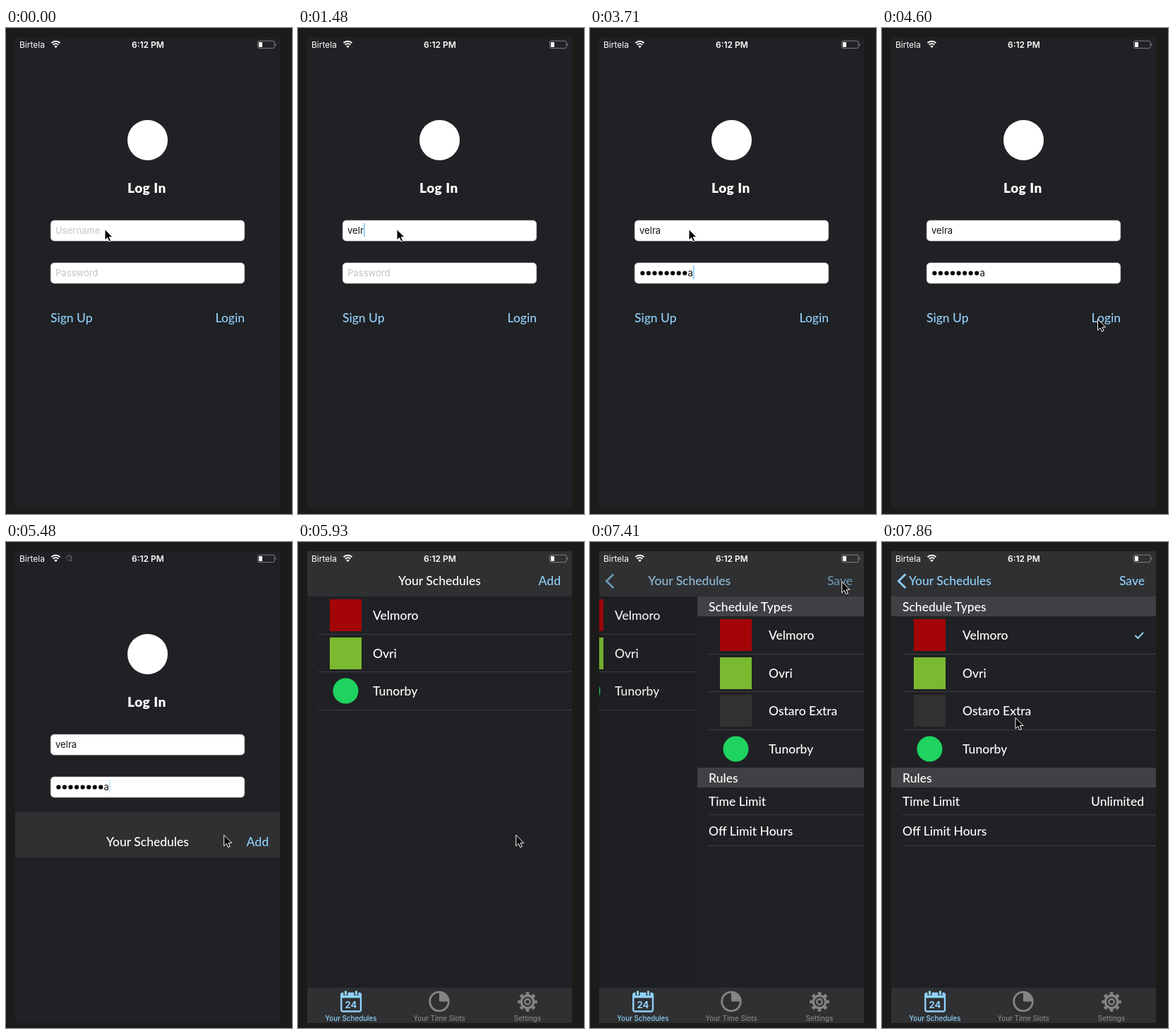
Recreate the animation shown at these times as an HTML page. Size 405 by 687 pixels, loop 8000 ms.

```html
<!DOCTYPE html>
<html lang="en">
<head>
<meta charset="utf-8">
<title>Schedules app</title>
<style>
  html, body { margin: 0; width: 100%; height: 100%; overflow: hidden; background: #1b1b1a; }
  svg { display: block; }
  text { font: 500 17.5px Lato, sans-serif; fill: #fff; white-space: pre; }
  .ui { font: 400 13.1px Inter, sans-serif; }
  .status { font-size: 12px; }
  .bold { font-weight: 600; }
  .hint { fill: #c4c4c8; }
  .typed { fill: #111; }
  .link { fill: #8fd0fa; }
  .tab { font: 500 9.8px Inter, sans-serif; text-anchor: middle; fill: #858587; }
  .tab.on { fill: #8fd0fa; }
  .end { text-anchor: end; }
  .rule { stroke: #3d3e41; }
  .line { fill: none; stroke: #fff; }
  .field { fill: #fff; stroke: #cdcdcd; stroke-width: .6; }
</style>
</head>
<body>
<svg width="405" height="687" viewBox="0 0 405 687">
  <clipPath id="screen"><path d="M13 13h375v667H13z"/></clipPath>
  <g clip-path="url(#screen)">
    <path d="M13 13h375v667H13z" fill="#202124"/>
    <circle cx="200.5" cy="158.5" r="28.5" fill="#fff"/>
    <text x="172" y="233" style="font-weight:900;font-size:19px;letter-spacing:.5px">Log In</text>
    <rect class="field" x="63.3" y="272" width="274.4" height="29" rx="5"/>
    <rect class="field" x="63.3" y="332" width="274.4" height="29" rx="5"/>
    <text class="ui hint" id="userHint" x="70" y="291">Username</text>
    <text class="ui hint" id="passHint" x="70" y="351">Password</text>
    <text class="ui typed" id="user" x="70" y="291"></text>
    <path id="dots" stroke="#000" stroke-width="6.2" stroke-linecap="round"/>
    <text class="ui typed" id="lastChar" y="351"></text>
    <rect id="caret" width="2" height="19" fill="#8fd0fa"/>
    <text class="link" x="63" y="416">Sign Up</text>
    <text class="link end" id="login" x="338" y="416">Login</text>

    <g id="modal">
      <path d="M13 13h375v667H13z" fill="#202124"/>
      <g id="list"></g>
      <path id="dim" d="M13 77h375v553H13z"/>
      <g id="detail"></g>
      <path d="M13 13h375v64H13zM13 630h375v50H13z" fill="#2f3032"/>
      <path id="chevron" class="line" d="M33.300 45.500l-10 9.800 10 9.800" style="stroke:#8fd0fa" stroke-width="2.800"/>
      <text id="title" y="61">Your Schedules</text>
      <text id="back" class="link" y="61">Your Schedules</text>
      <text id="add" class="link end" x="372" y="61">Add</text>
      <text id="save" class="link end" x="372" y="61">Save</text>

      <g fill="none" stroke="#8fd0fa" stroke-width="2.400">
        <rect x="61.300" y="638" width="27.700" height="25.500" rx="2.500"/>
        <path d="M61 641h28" stroke-width="7"/>
        <path d="M67.500 634v7M82.500 634v7" stroke="#2f3032" stroke-width="6"/>
        <path d="M67.500 634.500v6M82.500 634.500v6" stroke-width="3"/>
      </g>
      <text class="tab on" x="75" y="659" style="font-size:13.200px;font-weight:700">24</text>
      <g fill="none" stroke="#858587">
        <circle cx="200" cy="649.500" r="13.300" stroke-width="2.800"/>
        <path d="M200 637v12.500h12.500a12.500 12.500 0 0 0-12.500-12.500z" fill="#858587" stroke="none"/>
        <circle cx="325" cy="650" r="8.800" stroke-width="3.400"/>
        <circle cx="325" cy="650" r="11.800" stroke-width="4" pathLength="16" stroke-dasharray="1" stroke-dashoffset=".5"/>
        <circle cx="325" cy="650" r="3.800" stroke-width="2.400"/>
      </g>
      <text class="tab on" x="75" y="676.500">Your Schedules</text>
      <text class="tab" x="200" y="676.500">Your Time Slots</text>
      <text class="tab" x="325" y="676.500">Settings</text>
    </g>

    <text class="ui status" x="19" y="27.500">Birtela</text>
    <path class="line" d="M64.500 21.300a8.600 8.600 0 0 1 12 0M66.800 23.800a5.300 5.300 0 0 1 7.400 0" stroke-width="2"/>
    <path d="M68.300 25.700a3.200 3.200 0 0 1 4.400 0l-2.200 2.500z" fill="#fff"/>
    <g id="spinner"></g>
    <text class="ui status bold" x="178" y="27.500">6:12 PM</text>
    <rect class="line" x="356.400" y="18.300" width="23.800" height="10.400" rx="2.500" style="stroke:#98989a" stroke-width=".8"/>
    <path d="M358 20h5v7h-5z" fill="#fff"/>
    <path d="M381.500 21.500q2 2 0 4z" fill="#98989a"/>
  </g>
  <path id="cursor" d="M0 0V15.500l3.600-3.400 2.300 5.300 2.700-1.200-2.300-5h4.800z" fill="#000" stroke="#fff"/>
</svg>
<script>
const LOOP = 8000, FRAME = LOOP / 54;
const $ = id => document.getElementById(id);

const apps = {
  red: ['Velmoro', '#a40608'],
  green: ['Ovri', '#7ab930'],
  dark: ['Ostaro Extra', '#313131'],
  music: ['Tunorby', '#1ed35f'],
};

const rule = (x, y) => `<path class="rule" d="M${x} ${y + .5}H388"/>`;
const label = (x, y, s, cls = '') => `<text class="${cls}" x="${x}" y="${y}">${s}</text>`;
const header = (y, s) => `<path d="M13 ${y}h375v28H13z" fill="#404144"/>` + label(29, y + 21, s);

function appRows(keys, top, textX) {
  return keys.map((key, i) => {
    const y = top + Math.round(i * 53.5), [name, color] = apps[key];
    const icon = key === 'music'
      ? `<circle cx="67.5" cy="${y + 26.5}" r="18" fill="${color}"/>`
      : `<path d="M45 ${y + 4}h45v45H45z" fill="${color}"/>`;
    return icon + label(textX, y + 33, name);
  }).join('');
}

$('list').innerHTML = appRows(['red', 'green', 'music'], 77, 106)
  + [130, 183, 237].map(y => rule(28, y)).join('');

$('detail').innerHTML = '<path d="M13 77h375v553H13z" fill="#202124"/>'
  + appRows(['red', 'green', 'dark', 'music'], 105, 114)
  + [158, 211, 265, 385, 429].map(y => rule(29, y)).join('')
  + header(77, 'Schedule Types') + header(319, 'Rules')
  + '<path class="line" d="M358.500 132l4 4 7.500-8" style="stroke:#8fd0fa" stroke-width="2"/>'
  + label(29, 373, 'Time Limit') + label(371, 373, 'Unlimited', 'end')
  + label(29, 415, 'Off Limit Hours');

$('spinner').innerHTML = Array.from({ length: 8 }, (_, i) =>
  `<path d="M0-2.500V-5" stroke="#fff" stroke-opacity="${.15 + i * .08}" transform="rotate(${i * 45})"/>`).join('');

const userKeys = [600, 740, 890, 1480, 1630];
const passKeys = [2370, 2520, 2970, 3115, 3120, 3255, 3260, 3560, 3710];
const username = 'velra', password = 'sunoteria';

const cursorPath = [
  [3950, 140, 284.5], [4650, 308.7, 414.2], [6074, 308.7, 414.2], [6370, 394, 600], [6520, 396, 626],
  [6667, 392, 480], [7000, 357, 61], [7110, 356.7, 56.2], [7430, 356.7, 56.2], [7850, 189, 248.3],
];

const clamp = v => Math.max(0, Math.min(1, v));
const spring = ms => ms <= 0 ? 0 : ms >= 500 ? 1 : 1 - (1 + ms * .016) * Math.exp(-ms * .016);
const typedCount = (keys, t) => keys.filter(k => k <= t + 10).length;
const between = (t, a, b) => t >= a && t < b;
const move = (id, x, y) => $(id).setAttribute('transform', `translate(${x} ${y})`);
const fade = (id, v) => { $(id).style.opacity = v; };

function cursorAt(t) {
  const next = cursorPath.findIndex(p => p[0] > t);
  if (next < 1) return cursorPath.at(next).slice(1);
  const [t0, x0, y0] = cursorPath[next - 1], [t1, x1, y1] = cursorPath[next];
  let k = (t - t0) / (t1 - t0);
  k = k * k * (3 - 2 * k);
  return [x0 + (x1 - x0) * k, y0 + (y1 - y0) * k];
}

function drawForm(t) {
  const user = username.slice(0, typedCount(userKeys, t));
  const count = typedCount(passKeys, t), hidden = Math.max(0, count - 1);
  const lastX = 70 + hidden * 8.55;
  $('user').textContent = user;
  $('lastChar').textContent = count ? password[hidden] : '';
  $('lastChar').setAttribute('x', lastX);
  $('dots').setAttribute('d', Array.from({ length: hidden }, (_, i) => `M${74.4 + i * 8.55} 346.500h0`).join(''));
  fade('userHint', user ? 0 : 1);
  fade('passHint', count ? 0 : 1);

  const inPassword = t >= 1920;
  const caretX = inPassword
    ? lastX + (count ? $('lastChar').getComputedTextLength() : 0)
    : 70 + (user ? $('user').getComputedTextLength() : 0);
  const blink = clamp(.5 + 1.5 * Math.cos(Math.max(0, t - 4225) / 1000 * 2 * Math.PI));
  move('caret', caretX, inPassword ? 336 : 276);
  fade('caret', t < 140 ? 0 : blink);
  fade('login', between(t, 4730, 4900) ? .3 : 1);
}

function drawSchedules(t) {
  const rise = spring(t - 5387), push = spring(t - 7274);
  move('modal', 0, Math.round(667 * (1 - rise)));
  move('list', Math.round(-112.5 * push), 0);
  move('detail', Math.round(375 * (1 - push)), 0);
  fade('list', t < 5700 ? 0 : 1);
  fade('dim', .1 * push);

  const titleX = 142 - 104 * push ** 1.2;
  for (const id of ['title', 'back']) $(id).setAttribute('x', titleX);
  fade('title', 1 - push);
  for (const id of ['back', 'save', 'chevron']) fade(id, push);
  fade('add', between(t, 7200, 7274) ? .3 : clamp(1 - 2 * push));
}

function render(now) {
  const t = Math.floor((now % LOOP + 10) / FRAME) % 54 * FRAME;
  drawForm(t);
  drawSchedules(t);
  fade('spinner', between(t, 5030, 5900) ? 1 : 0);
  $('spinner').setAttribute('transform', `translate(89 23) rotate(${Math.floor(t / 90) * 45})`);
  move('cursor', ...cursorAt(t));
}

function tick() {
  render(performance.now());
  requestAnimationFrame(tick);
}
tick();
</script>
</body>
</html>
```
